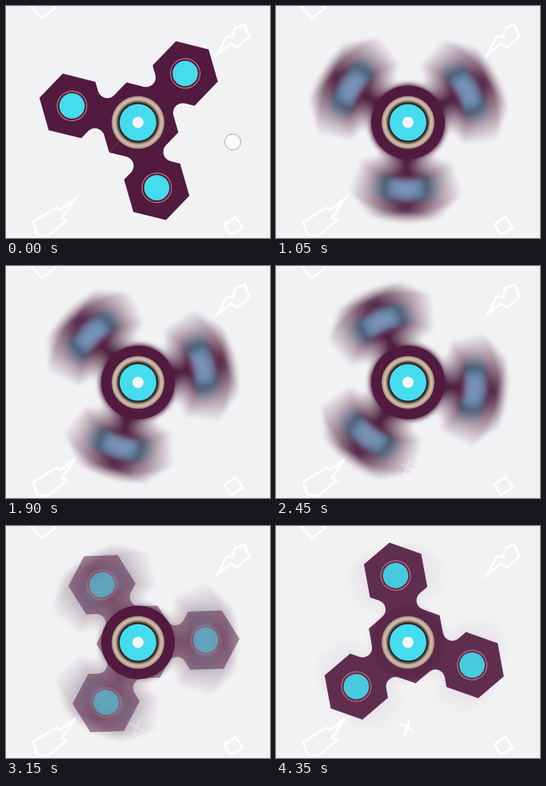
An HTML page with a canvas that plays this animation: 330x290 px, repeating every 4400 ms.

```html
<!DOCTYPE html>
<html lang="en">
<head>
<meta charset="utf-8">
<title>Spinner</title>
<style>
html, body { margin: 0; width: 330px; height: 290px; overflow: hidden; background: #f2f2f4; }
canvas { display: block; }
</style>
</head>
<body>
<canvas id="stage" width="330" height="290"></canvas>
<script>
const W = 330, H = 290, CX = 165, CY = 145.5, LOOP = 4400, STEP = 50;
const TAU = Math.PI * 2, RAD = Math.PI / 180;
const PURPLE = '#511a3e', BLUE = '#45dcee';
const ctx = document.getElementById('stage').getContext('2d');
const smear = document.createElement('canvas');
smear.width = W;
smear.height = H;
const sctx = smear.getContext('2d');

// time in ms, angle in degrees, speed in degrees per second
const SPIN = [
  [0, 74, 0], [1050, 572, 850], [1900, 1306, 890], [2450, 1806, 830],
  [3150, 2278, 540], [3650, 2498.5, 330], [4350, 2659.5, 110]
];
// time in ms, share of motion blur
const BLUR = [[0, 0], [750, 1], [2550, 1], [3150, .5], [3650, .3], [4350, .1]];

function segment(keys, t) {
  let i = 0;
  while (i < keys.length - 2 && t >= keys[i + 1][0]) i++;
  const a = keys[i], b = keys[i + 1], span = b[0] - a[0];
  return { a, b, span, u: (t - a[0]) / span };
}

function spinAngle(t) {
  const { a, b, span, u } = segment(SPIN, t), s = span / 1000, v = 1 - u;
  return a[1] * v * v * (1 + 2 * u) + a[2] * s * u * v * v
       + b[1] * u * u * (3 - 2 * u) - b[2] * s * u * u * v;
}

function blurAmount(t) {
  const { a, b, u } = segment(BLUR, t);
  return a[1] + (b[1] - a[1]) * u;
}

function makeBody() {
  const arm = new Path2D(), body = new Path2D();
  arm.moveTo(0, 0);
  arm.lineTo(26, -45);
  arm.arcTo(47.5, -7.8, 64, -36.4, 12);
  for (const [x, y] of [[64, -36.4], [106, -36.4], [127, 0], [106, 36.4], [64, 36.4]]) arm.lineTo(x, y);
  arm.arcTo(47.5, 7.8, 26, 45, 12);
  arm.lineTo(26, 45);
  arm.closePath();
  for (let i = 0; i < 3; i++) body.addPath(arm, new DOMMatrix().rotate(120 * i));
  return body;
}
const BODY = makeBody();

function disc(c, x, y, r, fill) {
  c.beginPath();
  c.arc(x, y, r, 0, TAU);
  c.fillStyle = fill;
  c.fill();
}

function spinner(c, angle, alpha) {
  c.save();
  c.globalAlpha = alpha;
  c.translate(CX, CY);
  c.rotate(angle * RAD);
  c.fillStyle = PURPLE;
  c.fill(BODY);
  for (let i = 0; i < 3; i++) {
    c.beginPath();
    c.arc(85, 0, 18.5, 0, TAU);
    c.strokeStyle = '#d48296';
    c.lineWidth = 1;
    c.stroke();
    disc(c, 85, 0, 15.8, BLUE);
    c.rotate(120 * RAD);
  }
  c.restore();
}

function blurredSpinner(angle, alpha) {
  const n = 15, spread = 20;
  sctx.clearRect(0, 0, W, H);
  sctx.globalCompositeOperation = 'lighter';
  for (let i = 0; i < n; i++) spinner(sctx, angle + spread * (2 * i / (n - 1) - 1), 1 / n);
  ctx.save();
  ctx.globalAlpha = alpha;
  ctx.filter = 'blur(2px)';
  ctx.drawImage(smear, 0, 0);
  ctx.restore();
}

function outline(points, closed = true) {
  ctx.beginPath();
  for (const [x, y] of points) ctx.lineTo(x, y);
  if (closed) ctx.closePath();
  ctx.stroke();
}

function backdrop() {
  ctx.fillStyle = '#f2f2f4';
  ctx.fillRect(0, 0, W, H);
  ctx.strokeStyle = '#fff';
  ctx.lineWidth = 3;
  outline([[32, 1], [45, 15], [62, 2], [48, -14]]);
  outline([[264, 61], [276, 38], [284, 39], [286, 28], [298, 23], [304, 38], [289, 52], [281, 47]]);
  outline([[86, 241], [68, 255], [63, 252], [34, 270], [39, 286], [52, 288], [76, 268], [70, 265]]);
  outline([[273, 273], [287, 264], [296, 277], [281, 286]]);
  outline([[155, 247], [172, 256]], false);
  outline([[167, 241], [160, 262]], false);
}

const ring = ctx.createRadialGradient(CX, CY, 23, CX, CY, 33);
[[0, '#1c1014'], [.2, '#4b3a35'], [.45, '#b7a292'], [.65, '#d3c1b0'], [.85, '#b6a094'], [1, '#a58b83']]
  .forEach(([at, color]) => ring.addColorStop(at, color));

function hub(blur) {
  ctx.globalAlpha = Math.min(1, 2 * blur);
  disc(ctx, CX, CY, 46, PURPLE);
  ctx.globalAlpha = 1;
  disc(ctx, CX, CY, 33, ring);
  disc(ctx, CX, CY, 23, BLUE);
  disc(ctx, CX, CY, 7, '#f4f6f7');
}

function pointer(t) {
  const u = t / 400;
  if (u >= 1) return;
  ctx.globalAlpha = 1 - u * u;
  const y = 170 + 40 * u * u;
  disc(ctx, 283.5, y, 10, '#fcfcfd');
  ctx.strokeStyle = '#a9a9ad';
  ctx.lineWidth = 1;
  ctx.stroke();
  ctx.globalAlpha = 1;
}

function draw(t) {
  const angle = spinAngle(t), blur = blurAmount(t);
  backdrop();
  if (blur > 0) blurredSpinner(angle, blur);
  if (blur < 1) spinner(ctx, angle, 1 - blur);
  hub(blur);
  pointer(t);
}

const start = performance.now();
function tick() {
  const t = (performance.now() - start) % LOOP;
  draw(Math.floor(t / STEP) * STEP);
  requestAnimationFrame(tick);
}
tick();
</script>
</body>
</html>
```
